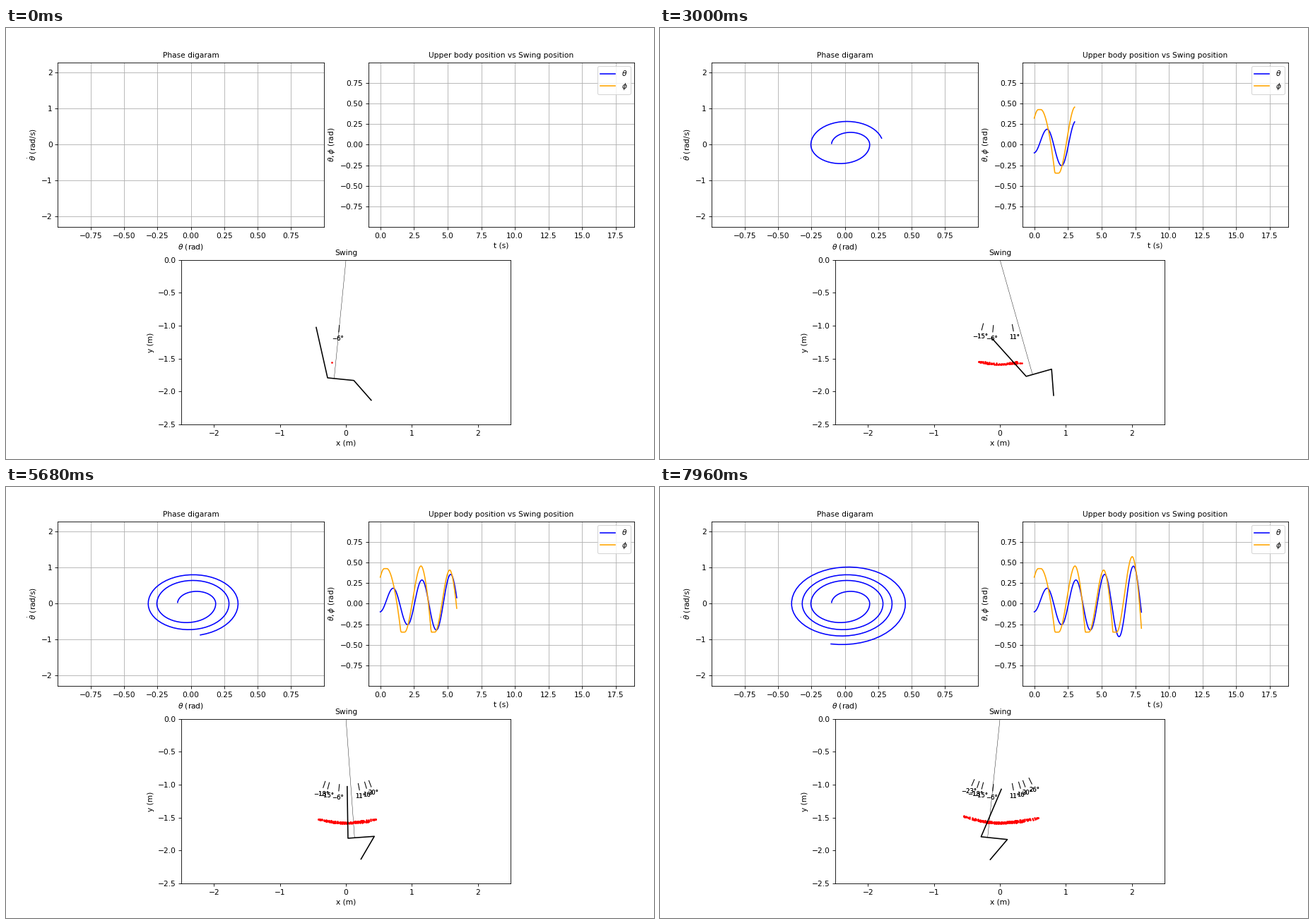
A matplotlib script that plays this animation: 917 px wide and 611 px high, repeating every 8 s.

```python
import numpy as np
import matplotlib.pyplot as plt
from matplotlib.animation import FuncAnimation

FRAMES, STEP = 200, 0.04
ROPE, TORSO, SHIN = 1.81, 0.785, 0.4
HIP, KNEE = -0.1, 0.3            # offsets along the seat
RATE = 2.38                      # peak rate per radian of swing
LEAN_MIN = -0.345

# Swing size at each turning point; the sides alternate
sizes = np.array([0.1, 0.187, 0.255, 0.287, 0.32, 0.355, 0.4, 0.455, 0.5])
turn = np.arange(len(sizes))
turn_angle = -sizes * (-1.0) ** turn
turn_time = 0.96 + 1.068 * (turn - 1)
turn_time[0] = -0.03             # released from rest

# Upper body: time and size of each backward lean, time it is fully forward
LEANS = [(0.5, 0.425, 1.53), (3.03, 0.457, 3.78),
         (5.16, 0.408, 5.84), (7.28, 0.57, 7.98)]


def ease(t, start, end):
    s = np.clip((t - start) / (end - start), 0, 1)
    return s * s * (3 - 2 * s)


def swing(t):
    """Angle and rate, one half ellipse in phase space per half swing."""
    k = np.searchsorted(turn_time, t, side="right") - 1
    u = np.pi * (t - turn_time[k]) / (turn_time[k + 1] - turn_time[k])
    mid = (turn_angle[k + 1] + turn_angle[k]) / 2
    half = (turn_angle[k + 1] - turn_angle[k]) / 2
    return mid - half * np.cos(u), RATE * half * np.sin(u)


def lean(t):
    """Rise gently to each lean, then drop ever faster to the forward stop."""
    angle = np.full_like(t, LEAN_MIN)
    rise = -1.0
    for top, height, stop in LEANS:
        span = height - LEAN_MIN
        up = LEAN_MIN + span * ease(t, rise, min(top, rise + 1.3))
        down = height - span * np.clip((t - top) / (stop - top), 0, 1) ** 1.8
        angle = np.where(t < rise, angle, np.where(t < top, up, down))
        rise = stop + 0.28
    return angle


def radial(r, a):
    return r * np.sin(a), -r * np.cos(a)


time = np.arange(FRAMES) * STEP
theta, rate = swing(time)
phi = lean(time)
psi = 0.82 - 0.66 * ease(time, 0.3, 1.7) - 0.76 * ease(time, 2.3, 3.75)


def to_world(along, up):
    """Seat coordinates to world coordinates for all frames."""
    c, s = np.cos(theta), np.sin(theta)
    return (ROPE - up) * s + along * c, -(ROPE - up) * c + along * s


seat = to_world(0, 0)
joints = [
    to_world(HIP - TORSO * np.sin(phi), TORSO * np.cos(phi)),
    to_world(HIP, 0),
    to_world(KNEE, 0),
    to_world(KNEE + SHIN * np.sin(psi), -SHIN * np.cos(psi)),
]
body_x, body_y = np.array(joints).transpose(1, 0, 2)

# Centre of mass from torso, thigh and shin
mass_x, mass_y = to_world(
    0.67 * (HIP - TORSO / 2 * np.sin(phi)) + 0.23 * 0.2
    + 0.1 * (KNEE + SHIN / 2 * np.sin(psi)),
    0.67 * TORSO / 2 * np.cos(phi) - 0.1 * SHIN / 2 * np.cos(psi))

DPI = 76.4
fig = plt.figure(figsize=(917.01 / DPI, 611.01 / DPI), dpi=DPI, facecolor="white")
grid = fig.add_gridspec(2, 2, left=0.08, right=0.9693, bottom=0.08, top=0.9203,
                        wspace=0.167, hspace=0.2)


def panel(cell, title, xlabel, ylabel, xlim, ylim, xticks, yticks):
    ax = fig.add_subplot(cell)
    ax.set_title(title, fontsize=10)
    ax.set_xlabel(xlabel)
    ax.set_ylabel(ylabel)
    ax.set_xticks(xticks)
    ax.set_yticks(yticks)
    ax.set_xlim(xlim)
    ax.set_ylim(ylim)
    return ax


quarters = np.arange(-3, 4) * 0.25
phase_ax = panel(grid[0, 0], "Phase digaram", r"$\theta$ (rad)",
                 r"$\dot{\theta}$ (rad/s)", (-0.9985, 0.9985), (-2.287, 2.287),
                 quarters, range(-2, 3))
time_ax = panel(grid[0, 1], "Upper body position vs Swing position", "t (s)",
                r"$\theta, \phi$ (rad)", (-0.898, 18.858), (-0.9975, 0.9975),
                np.arange(8) * 2.5, quarters)
swing_ax = panel(grid[1, :], "Swing", "x (m)", "y (m)", (-2.5, 2.5), (-2.5, 0),
                 range(-2, 3), np.arange(-5, 1) * 0.5)
swing_ax.set_aspect("equal")
phase_ax.grid(True)
time_ax.grid(True)

phase_line, = phase_ax.plot([], [], color="blue")
theta_line, = time_ax.plot([], [], color="blue", label=r"$\theta$")
phi_line, = time_ax.plot([], [], color="orange", label=r"$\phi$")
time_ax.legend(loc="upper right")

rope, = swing_ax.plot([], [], color="black", lw=0.4)
trail, = swing_ax.plot([], [], "o", color="red", ms=2.5, mew=0)
body, = swing_ax.plot([], [], color="black", lw=1.5)

# Tick and degree label at every turning point, text laid twice for weight
marks = []
for when, angle in zip(turn_time, turn_angle):
    (x0, y0), (x1, y1) = radial(1.0, angle), radial(1.1, angle)
    parts = swing_ax.plot([x0, x1], [y0, y1], color="black", lw=1)
    label = f"{round(np.degrees(angle))}°".replace("-", "\u2212")
    for _ in range(2):
        parts.append(swing_ax.text(*radial(1.2, angle), label, fontsize=8,
                                   ha="center", va="center"))
    marks.append((when, parts))


def update(i):
    n = i + 1
    phase_line.set_data(theta[:n], rate[:n])
    theta_line.set_data(time[:n], theta[:n])
    phi_line.set_data(time[:n], phi[:n])
    rope.set_data([0, seat[0][i]], [0, seat[1][i]])
    trail.set_data(mass_x[:n], mass_y[:n])
    body.set_data(body_x[:, i], body_y[:, i])
    for when, parts in marks:
        for part in parts:
            part.set_visible(time[i] >= when)
    return ()


anim = FuncAnimation(fig, update, frames=FRAMES, interval=STEP * 1000,
                     init_func=lambda: update(0), repeat=True, repeat_delay=0)
plt.show()
```
